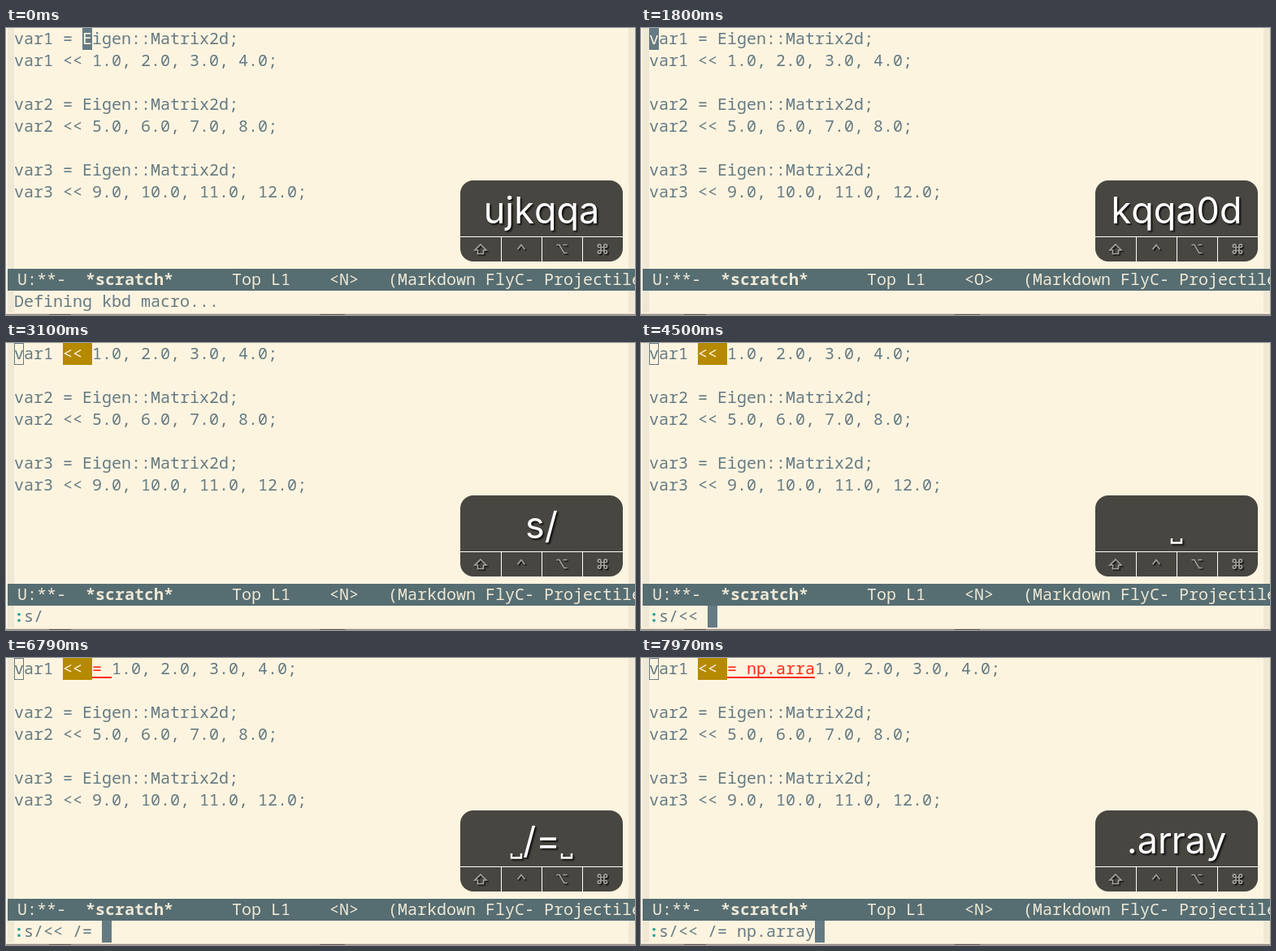
An HTML page with a canvas that plays this animation: 774 by 354 pixels, repeating every 8000 ms.

```html
<!DOCTYPE html>
<html lang="en">
<head>
<meta charset="utf-8">
<title>Keyboard macro</title>
<style>
html, body { margin: 0; width: 100%; height: 100%; overflow: hidden; background: #fdf4e0; }
canvas { display: block; }
</style>
</head>
<body>
<canvas id="stage" width="774" height="354"></canvas>
<script>
const ctx = document.getElementById('stage').getContext('2d');
const LOOP = 8000, CELL = 12, ROW = 27, LEFT = 10, MINI_Y = 324, MODE_Y = 297;
const MONO = '20px "Noto Sans Mono", "DejaVu Sans Mono", monospace';
const KEYS = '45px Inter, "Liberation Sans", sans-serif';
const C = {
  bg: '#fdf4e0', fringe: '#eee8d5', text: '#657b83', mode: '#566d72', modeText: '#eee8d5',
  match: '#b58900', insert: '#ff2a14', prompt: '#2aa198', panel: '#484640', dim: '#a3a19b'
};

const CODE = [
  'var1 = Eigen::Matrix2d;', 'var1 << 1.0, 2.0, 3.0, 4.0;', '',
  'var2 = Eigen::Matrix2d;', 'var2 << 5.0, 6.0, 7.0, 8.0;', '',
  'var3 = Eigen::Matrix2d;', 'var3 << 9.0, 10.0, 11.0, 12.0;'
];

// Each entry changes only the listed parts of the state.
const START = {
  keys: 'ujkqqa', shift: false, mode: 'N', echo: 'Defining kbd macro...', mini: null,
  col: 7, blink: true, deleted: false, match: 0, insert: ''
};
const on = { blink: true }, off = { blink: false };
const EVENTS = [
  [300, off], [600, on], [1000, off],
  [1200, { keys: 'jkqqa0', echo: '', col: 0, blink: true }],
  [1600, off],
  [1800, { keys: 'kqqa0d', mode: 'O', blink: true }],
  [1900, { keys: 'qqa0dd', mode: 'N', deleted: true }],
  [2300, off],
  [2500, { keys: '', shift: true }],
  [2600, { keys: ':', mini: ':', blink: true }],
  [2700, { keys: 's', shift: false, mini: ':s' }],
  [2800, { keys: 's/', mini: ':s/', match: 3 }],
  [3100, off], [3500, on], [3800, off],
  [4000, { keys: '', shift: true }],
  [4100, { keys: '<', mini: ':s/<', match: 1, blink: true }],
  [4200, { keys: '<<' }],
  [4300, { mini: ':s/<<', match: 2 }],
  [4400, { keys: '', shift: false }],
  [4500, { keys: '␣', mini: ':s/<< ', match: 3 }],
  [4800, off], [5100, on], [5500, off],
  [5800, { keys: '␣/' }],
  [5900, { mini: ':s/<< /', blink: true }],
  [6300, { keys: '␣/=', mini: ':s/<< /=', insert: '=' }],
  [6600, off],
  [6790, { keys: '␣/=␣', mini: ':s/<< /= ', insert: '= ', blink: true }],
  [7090, { keys: '/=␣n', mini: ':s/<< /= n' }],
  [7190, { keys: '/=␣np', insert: '= n' }],
  [7290, { mini: ':s/<< /= np', insert: '= np' }],
  [7390, { keys: '=␣np.', mini: ':s/<< /= np.' }],
  [7490, { insert: '= np.' }],
  [7570, { keys: '␣np.a', mini: ':s/<< /= np.a', insert: '= np.a' }],
  [7770, { keys: 'np.ar', mini: ':s/<< /= np.ar', insert: '= np.ar' }],
  [7870, { keys: 'p.arra', mini: ':s/<< /= np.arra', insert: '= np.arr' }],
  [7970, { keys: '.array', mini: ':s/<< /= np.array', insert: '= np.arra' }]
];

const ICONS = [
  [584, 273, 'M0-6 L7 1 H3.5 V5.5 H-3.5 V1 H-7 Z'],
  [634, 270, 'M-4.5 3 L0-2.5 L4.5 3'],
  [684, 272.5, 'M-6.5-5 H-3 L3 5 H6.5 M1.5-5 H6.5'],
  [734, 272.5, 'M-2-2 H2 V2 H-2 Z' +
    'M-2-2 H-3.8 A1.8 1.8 0 1 1-2-3.8 Z M2-2 V-3.8 A1.8 1.8 0 1 1 3.8-2 Z' +
    'M2 2 H3.8 A1.8 1.8 0 1 1 2 3.8 Z M-2 2 V3.8 A1.8 1.8 0 1 1-3.8 2 Z']
].map(([x, y, d]) => ({ x, y, path: new Path2D(d) }));

function stateAt(t) {
  const s = { ...START };
  for (const [time, change] of EVENTS) if (time <= t) Object.assign(s, change);
  return s;
}

function rect(color, x, y, w, h) {
  ctx.fillStyle = color;
  ctx.fillRect(x, y, w, h);
}

function text(str, x, top, color = C.text, weight = '') {
  ctx.font = weight + ' ' + MONO;
  ctx.fillStyle = color;
  ctx.fillText(str, x, top + 20);
}

function block(x, top, char) {
  rect(C.text, x, top, CELL, ROW);
  text(char, x, top, C.bg);
}

function shadow(blur, offset) {
  ctx.shadowColor = 'rgba(0,0,0,.75)';
  ctx.shadowBlur = blur;
  ctx.shadowOffsetX = ctx.shadowOffsetY = offset;
}

function drawFrame() {
  rect(C.bg, 0, 0, 774, 354);
  rect(C.fringe, 2, 0, 8, 351);
  rect(C.fringe, 766, 0, 8, 351);
  rect('#e0d8c6', 0, 352, 774, 1);
  rect('#94877a', 0, 353, 774, 1);
  rect('#5d5048', 53, 353, 27, 1);
  rect('#5d5048', 386, 353, 31, 1);
}

function drawCode(s) {
  const lines = s.deleted ? CODE.slice(1) : CODE;
  lines.forEach((line, i) => {
    if (i === 0 && s.insert) line = line.slice(0, 8) + ' '.repeat(s.insert.length) + line.slice(8);
    text(line, LEFT, i * ROW);
  });
  if (s.match) {
    const x = LEFT + 5 * CELL;
    rect(C.match, x, 0, s.match * CELL, ROW);
    text('<< '.slice(0, s.match), x, 0, C.bg);
  }
  if (s.insert) {
    const x = LEFT + 8 * CELL;
    text(s.insert, x, 0, C.insert);
    rect(C.insert, x, 23, s.insert.length * CELL, 2);
  }
  if (s.mini !== null) {
    ctx.strokeStyle = C.text;
    ctx.lineWidth = 1;
    ctx.strokeRect(LEFT + .5, .5, CELL - 1, ROW - 1);
  } else if (s.blink) {
    block(LEFT + s.col * CELL, 0, lines[0][s.col]);
  }
}

function drawModeLine(s) {
  rect(C.mode, 2, MODE_Y, 772, ROW);
  const put = (col, str, weight) => text(str, 14 + col * CELL, MODE_Y, C.modeText, weight);
  put(0, 'U:**-');
  put(7, '*scratch*', 'bold');
  put(22, 'Top L1');
  put(32, '<' + s.mode + '>');
  put(38, '(Markdown FlyC- Projectile');
}

function drawMini(s) {
  if (s.mini === null) return text(s.echo, LEFT, MINI_Y);
  text(':', LEFT, MINI_Y, C.prompt, 'bold');
  text(s.mini.slice(1), LEFT + CELL, MINI_Y);
  if (s.blink) block(LEFT + s.mini.length * CELL, MINI_Y, '');
}

function drawKeys(keys) {
  ctx.font = KEYS;
  const width = c => c === '␣' ? 16 : ctx.measureText(c).width;
  const total = [...keys].reduce((sum, c) => sum + width(c), 0);
  let x = 659 - total / 2;
  ctx.save();
  shadow(2, 2);
  ctx.fillStyle = ctx.strokeStyle = '#fff';
  ctx.lineWidth = 2.5;
  for (const c of keys) {
    if (c === '␣') {
      ctx.beginPath();
      ctx.moveTo(x + 2, 241);
      ctx.lineTo(x + 2, 246.5);
      ctx.lineTo(x + 14, 246.5);
      ctx.lineTo(x + 14, 241);
      ctx.stroke();
    } else {
      ctx.fillText(c, x, 241);
    }
    x += width(c);
  }
  ctx.restore();
}

function drawPanel(s) {
  ctx.fillStyle = C.panel;
  ctx.beginPath();
  ctx.roundRect(559, 188, 200, 100, 16);
  ctx.fill();
  rect('#fff', 559, 257, 200, 1);
  for (const x of [609, 659, 709]) rect('#fff', x, 258, 1, 30);
  ICONS.forEach(({ x, y, path }, i) => {
    const lit = i === 0 && s.shift;
    ctx.save();
    ctx.translate(x, y);
    shadow(1, 1.5);
    ctx.strokeStyle = lit ? '#fff' : C.dim;
    ctx.lineWidth = lit ? 2 : 1.7;
    ctx.stroke(path);
    ctx.restore();
  });
  drawKeys(s.keys);
}

function draw(now) {
  const s = stateAt(now % LOOP);
  drawFrame();
  drawCode(s);
  drawModeLine(s);
  drawMini(s);
  drawPanel(s);
}

let start;
function tick(now) {
  start ??= now;
  draw(now - start);
  requestAnimationFrame(tick);
}
draw(0);
requestAnimationFrame(tick);
</script>
</body>
</html>
```
